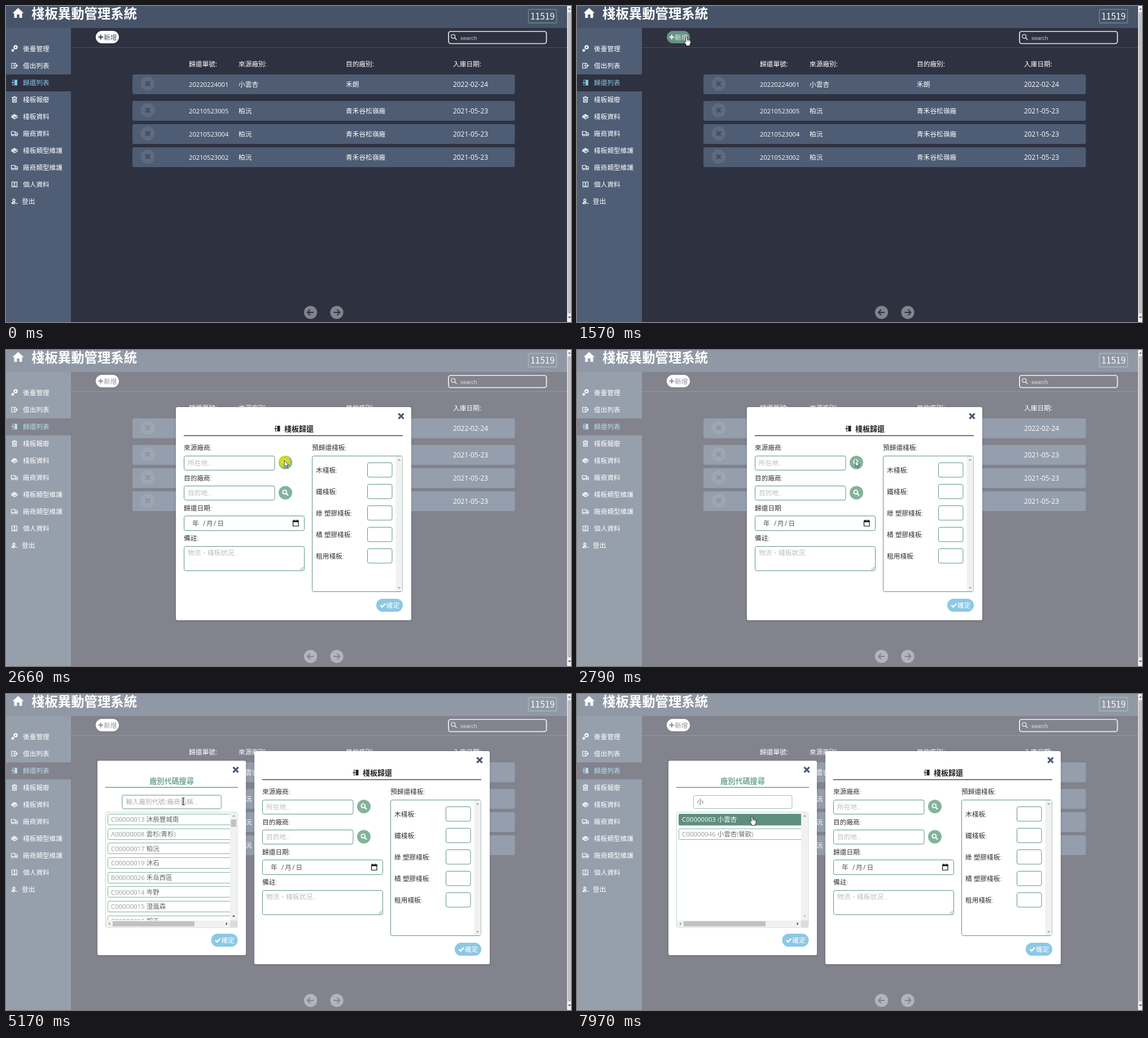
An HTML page that plays this animation: 1001x559 px, repeating every 8000 ms.

```html
<!DOCTYPE html>
<html lang="zh-Hant">
<head>
<meta charset="utf-8">
<title>棧板異動管理系統</title>
<style>
html, body { margin: 0; width: 100%; height: 100%; overflow: hidden; background: #2e3140; }
svg { display: block; width: 1001px; height: 559px; }
text { font-family: "Open Sans", "Noto Sans CJK TC", "Noto Sans CJK", sans-serif; white-space: pre; }
.cjk { font-family: "Noto Sans CJK TC", "Noto Sans CJK", sans-serif; }
.arial { font-family: "Liberation Sans", Arial, sans-serif; }
.thin { font-weight: 300; }
.card { filter: drop-shadow(0 1px 2px rgba(0, 0, 0, .16)); }
</style>
</head>
<body>
<svg id="stage" viewBox="0 0 1001 559" xmlns="http://www.w3.org/2000/svg"></svg>
<script>
const LOOP = 8000, SIZE = 11.7;
const NAVY = '#2e3140', SLATE = '#4f5e75', GREEN = '#5d9484', MINT = '#82b39c';

// Markup helpers
const rect = (x, y, w, h, fill, more = '') =>
  `<rect x="${x}" y="${y}" width="${w}" height="${h}" fill="${fill}" ${more}/>`;
const circle = (x, y, r, fill, more = '') =>
  `<circle cx="${x}" cy="${y}" r="${r}" fill="${fill}" ${more}/>`;
const path = (d, fill, more = '') => `<path d="${d}" fill="${fill}" ${more}/>`;
const line = (d, color, width = 1, more = '') =>
  path(d, 'none', `stroke="${color}" stroke-width="${width}" ${more}`);
const text = (x, mid, s, fill = '#fff', size = SIZE, more = '') =>
  `<text x="${x}" y="${(mid + size * .36).toFixed(2)}" font-size="${size}" fill="${fill}" ${more}>${s}</text>`;
const group = (id, body, more = '') => `<g id="${id}" ${more}>${body}</g>`;
const at = (x, y, body) => `<g transform="translate(${x} ${y})">${body}</g>`;
const field = (x, y, w, h, color = GREEN) =>
  rect(x + .5, y + .5, w - 1, h - 1, '#fff', `rx="3" stroke="${color}"`);
const cross = (x, y, r, color, width) =>
  line(`M${x - r} ${y - r}l${2 * r} ${2 * r}m0 ${-2 * r}l${-2 * r} ${2 * r}`, color, width);
const lens = (x, y, color, width) =>
  circle(x - 1.2, y - 1.2, 3.4, 'none', `stroke="${color}" stroke-width="${width}"`) +
  line(`M${x + 1.4} ${y + 1.4}l3.6 3.6`, color, width + .3);
const lensButton = (x, y) => circle(x, y, 12, MINT) + lens(x, y, '#fff', 1.9);
const okButton = (x, y) => rect(x, y, 47, 23, '#8cc8e5', 'rx="11.5"') +
  line(`M${x + 7.5} ${y + 11.5}l3 3.2l5.5 -6`, '#fff', 2.5) + text(x + 18, y + 11.7, '確定');
const tip = (x, y, angle, color, more = '') =>
  path('M-2.7 1.4L0 -1.6L2.7 1.4Z', color, `transform="translate(${x} ${y}) rotate(${angle})" ${more}`);

// Icons around their own centre
const door = (c, solid) => (solid
  ? path('M0 -5H5V5H0Z', c) + line('M-1 -4.5H-3V-2.5M-1 4.5H-3V2.5', c, 1.1) + line('M-5.5 0H-1.5M-3.3 -1.8L-1.3 0L-3.3 1.8', c, 1.2)
  : line('M-5 -4.3H0V4.5H-5ZM0 -4H2.5V-2M0 4H2.5V2M-1.7 -1V1', c, 1.1) + line('M1 0H5M3.3 -2L5.3 0L3.3 2', c, 1.2));
const pallet = path('M-6 -1L0 -4.5L6 -1.5L0 2ZM-6 1L-4 0L0 3.5L6 0V1.5L0 5L-3 3.3V2.2L-6 2Z', '#fff') +
  line('M-3 -2L2 1M1 -3.5L4.5 -1.5', SLATE, .8);
const truck = line('M-5.5 -3.5H1V2.5H-5.5ZM1 -1.7H4L5.5 .5V2.5H1', '#fff', 1.2) +
  [-3, 3].map(x => circle(x, 3, 1.5, SLATE, 'stroke="#fff" stroke-width="1.1"')).join('');
const icons = [
  circle(2, -2.6, 2.6, 'none', 'stroke="#fff" stroke-width="2.2"') + circle(-3, 3, 1.6, 'none', 'stroke="#fff" stroke-width="1.7"'),
  door('#fff', false),
  door('#86c5e6', true),
  line('M-5 -3.7H5M-1.5 -5H1.5M-3.3 -3V4.7H3.3V-3M-1.1 -1.6V3M1.1 -1.6V3', '#fff', 1.3),
  pallet, truck, pallet, truck,
  line('M-4.5 -4.2H4.5V4.4H-4.5Z', '#fff', 1.2) + circle(0, -1, 1.4, '#fff') + path('M-2.7 3Q0 -.3 2.7 3Z', '#fff'),
  circle(-1, -2, 2, 'none', 'stroke="#fff" stroke-width="1.3"') + line('M-4.7 4V3Q-1 -.5 2 3M-4.7 4H1M3 3.6H5.5', '#fff', 1.4)
];

const menu = ['後臺管理', '借出列表', '歸還列表', '棧板報廢', '棧板資料', '廠商資料', '棧板類型維護', '廠商類型維護', '個人資料', '登出'];
const records = [
  [121, '20220224001', '小雲杏', '禾朗', '2022-02-24'],
  [168, '20210523005', '柏沅', '青禾谷松嶺廠', '2021-05-23'],
  [209, '20210523004', '柏沅', '青禾谷松嶺廠', '2021-05-23'],
  [250, '20210523002', '柏沅', '青禾谷松嶺廠', '2021-05-23']
];
const vendors = ['C00000013 沐辰豐城南', 'A00000008 雲杉(青杉)', 'C00000017 柏沅', 'C00000019 沐石',
  'B00000026 禾岳西區', 'C00000014 岑野', 'C00000015 澄嵐森', 'C00000012 朔禾'];
const matches = ['C00000003 小雲杏', 'C00000046 小雲杏(餐飲)'];

function page() {
  let s = rect(0, 0, 994, 559, NAVY) + rect(0, 0, 994, 39, '#475368') + rect(0, 39, 115, 520, SLATE) +
    path('M21.5 3.5L11.5 12.5H14.5V21H19.3V15H23.7V21H28.5V12.5H31.5Z', '#fff') +
    text(45, 14, '棧板異動管理系統', '#fff', 23.4, 'class="cjk" font-weight="700"') +
    rect(925.5, 6, 50, 24, 'none', 'rx="2" stroke="#648f88" stroke-width="1.4"') +
    text(929, 18.5, '11519', '#fff', 15.5, 'class="cjk"') +
    rect(0, 121, 115, 30, NAVY) + line('M115 73.5H994', '#4b5062');
  menu.forEach((name, i) => {
    const y = 76 + 30 * i;
    s += at(15, y - .5, icons[i]) + text(i === 9 ? 28 : 30, y, name, i === 2 ? '#86c5e6' : '#fff');
  });
  s += rect(159, 44, 41, 22, '#fff', 'id="add" rx="11"') +
    group('addInk', line('M163.5 55H172M167.75 50.8V59.2', 'currentColor', 2.3) + text(173, 55.3, '新增', 'currentColor')) +
    rect(784, 45, 173.5, 21.5, 'none', 'rx="4" stroke="#e9eaec" stroke-width="1.7"') +
    lens(793.5, 55, '#d5d7dc', 1.4) + text(805, 56, 'search', '#c8cad0', 9.8, 'class="arial"');
  const columns = [324, 412, 602, 792];
  ['歸還單號:', '來源廠別:', '目的廠別:', '入庫日期:'].forEach((h, i) => s += text(columns[i], 103, h));
  for (const [y, ...cells] of records) {
    s += rect(224, y, 677.5, 35, '#4e5d74', 'rx="3"') + circle(251, y + 16.5, 12.5, '#5f6a7e') +
      cross(251, y + 16.5, 3.8, '#454e61', 3.2);
    cells.forEach((c, i) => s += text(columns[i], y + 18, c, '#fff', [11.2, SIZE, SIZE, 11.9][i]));
  }
  [[539.5, -1], [586, 1]].forEach(([x, d]) => s += circle(x, 542, 11.6, '#81838d') +
    line(`M${x - 5.5 * d} 542H${x + 5 * d}M${x + .5 * d} 537l${5 * d} 5l${-5 * d} 5`, NAVY, 1.9));
  return s;
}

function returnCard() {
  const label = (x, y, s) => text(x, y, s, '#333', SIZE, 'class="thin"');
  const hint = (x, y, s) => text(x, y, s, '#bdbdbd', SIZE, 'class="thin"');
  let s = rect(301, 101, 417, 377, '#fff', 'rx="3" class="card"') + cross(700, 117, 4.6, '#4a5870', 3.1) +
    at(480.5, 139, door('#222', true)) + text(493, 139.3, '棧板歸還', '#222', 13, 'font-weight="600"') +
    line('M315 151.5H703', '#40465f', 1.5);
  [['來源廠商:', 173], ['目的廠商:', 227], ['歸還日期:', 280], ['備註:', 333]].forEach(([l, y]) => s += label(315, y, l));
  s += label(542, 173, '預歸還棧板:') +
    field(315, 187, 161.5, 26) + hint(322, 199.5, '所在地...') + lensButton(495, 199) +
    field(315, 240, 161.5, 26) + hint(322, 253, '目的地...') + lensButton(495, 252.5) +
    field(315, 293, 214, 27) +
    [[330, '年'], [349, '/'], [355, '月'], [368, '/'], [374.5, '日']].map(([x, c]) => text(x, 307, c, '#555')).join('') +
    line('M508.5 302.5H518V311.5H508.5Z', '#111', 1.2) + path('M508 301.5H518.6V304.5H508ZM510 300H511.3V302H510ZM515.2 300H516.5V302H515.2Z', '#111') +
    field(315, 347, 214, 44) + hint(322, 359, '物流、棧板狀況...') +
    line('M521.5 389L527 383.5M525 389L527 387', '#777') +
    field(542, 187, 161, 241) + rect(690.5, 188, 12, 239, '#f1f1f1') +
    tip(696.5, 194, 0, '#a3a3a3') + tip(696.5, 421, 180, '#a3a3a3');
  ['木棧板:', '鐵棧板:', '綠 塑膠棧板:', '橘 塑膠棧板:', '租用棧板:'].forEach((l, i) => {
    const y = 199 + 38.1 * i;
    s += label(549, y + 13.5, l) + field(640, Math.round(y), 44.5, 26.5);
  });
  return s + okButton(656, 440);
}

const vendorRows = names => names.map((n, i) => {
  const y = 212 + 25.65 * i;
  return rect(180.5, Math.round(y) + .5, 240, 19, '#fff', `rx="2" stroke="${MINT}"`) +
    text(186, y + 10.2, n, '#666', 11.5, 'class="thin"');
}).join('');

function searchCard() {
  return rect(162, 118, 263, 344, '#fff', 'rx="3" class="card"') + cross(407, 134, 4.6, '#4a5870', 3.1) +
    text(293.5, 154, '廠別代碼搜尋', '#73a791', 13.1, 'text-anchor="middle" font-weight="600"') +
    line('M176 165.3H411', '#6c9f8d', 1.4) +
    rect(205, 178.5, 177, 25, 'none', `id="ring" rx="4" stroke="${MINT}" stroke-width="1.8"`) +
    field(206, 179, 175.5, 24, '#94bfac') +
    text(212.5, 190.7, '輸入廠別代號/廠商名稱...', '#adadad', 11.5, 'id="hint" class="thin"') +
    text(212.5, 190.7, '', '#666', SIZE, 'id="typed" class="cjk"') +
    line('M0 197.5H1', '#555', 1, 'id="under"') + rect(0, 184, 1, 13.5, '#222', 'id="caret"') +
    rect(176.5, 209, 233.5, 204, '#fff', 'rx="3" stroke="#bcd6cb"') +
    `<g clip-path="url(#listClip)">` + group('all', vendorRows(vendors)) +
    group('found', vendorRows(matches) +
      group('pressed', rect(180, 212, 230, 20.5, '#5e8e80', 'rx="2"') + text(186, 222.2, matches[0], '#fff', 11.5))) + '</g>' +
    rect(397, 209.5, 12.5, 191, '#f1f1f1') + rect(177, 400.5, 220, 12, '#f1f1f1') + rect(397, 400.5, 12.5, 12, '#dcdcdc') +
    rect(398.5, 222, 9.5, 13, '#c1c1c1', 'id="thumb"') + rect(189, 402, 145, 9, '#c1c1c1') +
    tip(403.5, 215.5, 0, '#9c9c9c') + tip(403.5, 393.5, 180, '#505050', 'id="down"') +
    tip(183, 406.5, -90, '#9c9c9c') + tip(391, 406.5, 90, '#505050') +
    okButton(363.5, 424);
}

const pointers =
  group('arrow', path('M0 0V11.6L2.7 9.2L4.4 13.3L6.2 12.5L4.5 8.6H8Z', '#fff', 'stroke="#222" stroke-width=".9"')) +
  group('hand', path('M-1.4 1.4Q0 -.4 1.3 1.4V5.4Q2.6 4.5 3.7 5.8Q5 5 5.9 6.6Q7.2 6.2 7.4 8V11.5L6 14V16.4H-.8V14.4L-4.2 9.8Q-4.4 7.8 -2.6 8.6L-1.4 9.8Z', '#fff', 'stroke="#222" stroke-width="1"') +
    line('M1.3 5.5V8.5M3.6 6V8.7M5.7 7V9', '#222', .7)) +
  group('beam', line('M-2.6 -6H-.6L0 -5.3L.6 -6H2.6M-2.6 6H-.6L0 5.3L.6 6H2.6M0 -5.3V5.3', '#222', 1.1));

document.getElementById('stage').innerHTML =
  '<defs><clipPath id="listClip"><rect x="177" y="209.5" width="220" height="191"/></clipPath></defs>' +
  page() + rect(0, 0, 994, 559, '#fff', 'id="veil" opacity=".4"') +
  rect(994, 0, 7, 559, '#f1f1f1') + rect(995, 11, 6, 533, '#c1c1c1') + tip(998.3, 5, 0, '#777') + tip(998.3, 551, 180, '#505050') +
  group('back', returnCard()) + group('search', searchCard()) +
  circle(0, 0, 10.5, '#e8e800', 'id="glow" opacity=".72"') + group('pointer', pointers);

const el = {};
document.querySelectorAll('[id]').forEach(n => el[n.id] = n);
const show = (id, on) => el[id].setAttribute('display', on ? 'inline' : 'none');
const set = (id, name, value) => el[id].setAttribute(name, value);
const during = (t, a, b) => t >= a && t < b;

// start, last step, step count, then stops as [progress, x, y]
const moves = [
  [500, 1240, 12, [0, 994, 555], [1, 195, 56]],
  [1310, 1310, 1, [0, 195, 56], [1, 194, 54]],
  [1900, 2250, 6, [0, 194, 54], [1, 486, 206]],
  [2450, 2590, 3, [0, 486, 206], [1, 493, 195]],
  [3120, 3890, 12, [0, 493, 195], [7 / 12, 313.5, 223], [1, 295, 252]],
  [3960, 4710, 11, [0, 295, 252], [.35, 300, 281], [1, 314, 190]],
  [7420, 7700, 5, [0, 314, 190], [1, 310, 216]]
];

function pointerAt(t) {
  const [start, end, steps, ...stops] = moves.filter(m => m[0] <= t).pop() || moves[0];
  const done = Math.floor((t - start) / ((end - start) || 1) * (steps - 1) + .001) + 1;
  let p = Math.max(0, Math.min(1, done / steps));
  if (stops.length === 2) p = p * p * (3 - 2 * p);
  const i = Math.max(1, stops.findIndex(s => s[0] >= p - 1e-6));
  const [a, ax, ay] = stops[i - 1], [b, bx, by] = stops[i];
  const u = (p - a) / (b - a);
  return [ax + (bx - ax) * u, ay + (by - ay) * u];
}

function pointerShape(t, x, y) {
  const inside = (l, top, r, b) => x >= l && x <= r && y >= top && y <= b;
  if (t < 1640) return inside(159, 44, 200, 66) ? 'hand' : 'arrow';
  const shift = t >= 2860 ? 139 : 0;
  if (inside(315 + shift, 187, 476 + shift, 213)) return 'beam';
  if (shift && inside(206, 179, 381, 203)) return 'beam';
  return shift && inside(180, 212, 397, 400) ? 'hand' : 'arrow';
}

const keys = [[5500, 'ㄒ'], [5630, 'ㄒㄧ'], [5830, 'ㄒㄧㄠ'], [6160, '小']];

function draw(t) {
  const open = t >= 1640, picking = t >= 2860;
  const [x, y] = pointerAt(t), shape = pointerShape(t, x, y);
  const hover = shape === 'hand' && !open;
  set('add', 'fill', hover ? '#669184' : '#fff');
  set('addInk', 'color', hover ? '#e3ebe8' : '#4a5263');
  show('veil', open);
  show('back', open);
  set('back', 'transform', `translate(${picking ? 139 : 0} 0)`);
  show('search', picking);

  const typed = keys.filter(k => k[0] <= t).map(k => k[1]).pop() || '';
  const end = 212.5 + typed.length * SIZE;
  el.typed.textContent = typed;
  show('hint', !typed);
  show('under', typed && t < 6430);
  set('under', 'd', `M213 197.5H${end - 1}`);
  set('caret', 'x', typed ? Math.floor(end) : 212);
  show('caret', during(t, 4640, 5170) || during(t, 5500, 6960) || during(t, 7490, 7900));
  show('ring', during(t, 4640, 7900));
  set('ring', 'opacity', t < 4710 ? .2 : .4);

  const filtered = t >= 6620;
  show('all', !filtered);
  show('found', filtered);
  show('thumb', t < 6690);
  set('down', 'fill', t < 6690 ? '#505050' : '#c4c4c4');
  show('pressed', t >= 7900);
  set('pressed', 'opacity', t < 7970 ? .55 : 1);

  show('glow', during(t, 1440, 1570) || during(t, 2590, 2790));
  set('glow', 'cx', x + .5);
  set('glow', 'cy', y + 2.5);
  show('pointer', t >= 500);
  set('pointer', 'transform', `translate(${x} ${y})`);
  ['arrow', 'hand', 'beam'].forEach(s => show(s, s === shape));
}

function tick() {
  draw(performance.now() % LOOP);
  requestAnimationFrame(tick);
}
tick();
</script>
</body>
</html>
```
